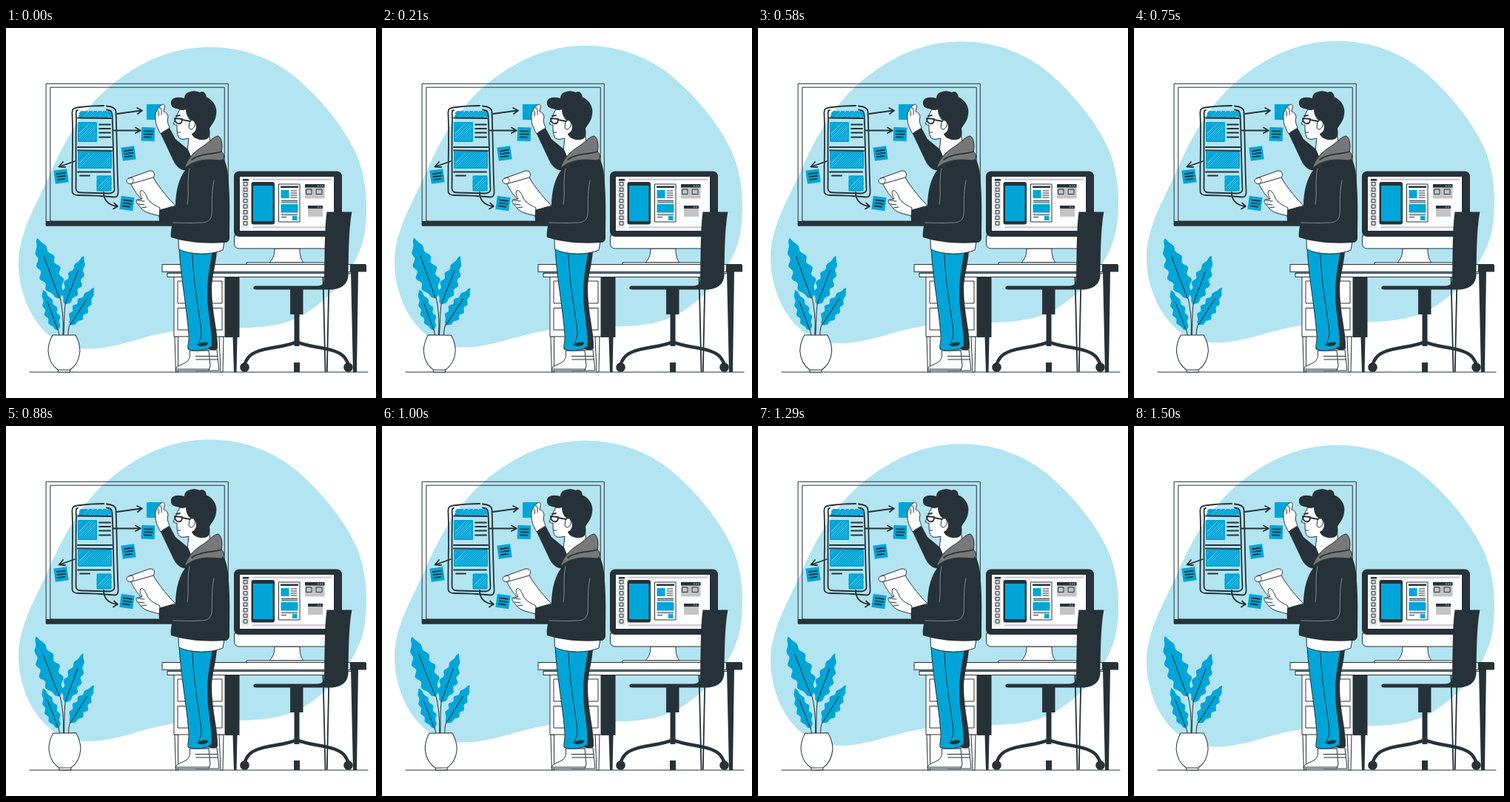
Write an HTML page that moves like this. It is 500 px wide and 500 px high and loops after 1.54 s.

```html
<!DOCTYPE html>
<html lang="en">
<head>
<meta charset="utf-8">
<title>Designer at the whiteboard</title>
<style>
  html, body { margin: 0; width: 100%; height: 100%; overflow: hidden; background: #fff; }
  svg { display: block; width: 100%; height: 100%; }
  .d { fill: #263238; }
  .b { fill: #00a5d7; }
  .w { fill: #fff; stroke: #263238; stroke-width: 1; stroke-linejoin: round; }
  .bo { fill: #00a5d7; stroke: #263238; stroke-width: 1; stroke-linejoin: round; }
  .l { fill: none; stroke: #263238; stroke-width: 1; stroke-linecap: round; stroke-linejoin: round; }
  .k { fill: none; stroke: #263238; stroke-width: 1.8; stroke-linecap: round; stroke-linejoin: round; }
  .h { fill: none; stroke: #00a5d7; stroke-width: 1.9; stroke-linejoin: round; }
  .g { fill: none; stroke: #858a8d; stroke-width: 1; stroke-linecap: round; }
</style>
</head>
<body>
<svg viewBox="0 0 500 500">
  <path id="blob" fill="#b2e4f2" d="M275 25.5C321 25.5 362 42 392 67C427 97 459 136 475 174C487 205 490 243 484 280C476 320 447 357 410 382C382 402 345 406 300 405C250 404 217 410 180 420C142 431 112 439 80 428C42 414 17 365 17 318C17 275 43 235 60 196C80 150 106 107 140 79C181 45 225 25.5 275 25.5Z"/>
  <path class="l" d="M32 465H489"/>

  <g id="board">
    <path class="l" d="M54.5 75.3H300.3V267H54.5ZM60.2 80.2H295.2V261H60.2Z"/>
    <path class="d" d="M54 261H300.5V267.5H54Z"/>
    <g id="hatch"></g>
    <path class="k" d="M132 105C118 105 106 106 96 107.5C91 108 89 110 89.5 117C91 150 89 185 89.5 221C90 225 93 226 98 226C114 226 131 227 147 228.5C151 228.5 152 225 151.5 219C150 185 150 150 148.5 113C148 108 143 106 136 105.5"/>
    <path class="k" d="M97 111C94 111 94.5 115 95 122C94 155 95 190 94.5 217C95 222 98 222.500 103 222.500L140 223.500C145 223 147 221 146.500 216C145 184 145 150 143.500 117C143 112 141 111 136 110.500"/>
    <path class="k" d="M97 121.500L142 122M126 130.500H141M126 136H141M126 141.500H141M126 147.500H141M97 161H143M97 165.500L143 166M97 194.500H141M100 199.500H113"/>
    <path class="k" d="M150 116L183 111.500M177 108L184 111.500L178 116M145 138.500H181M175 134.500L182 138.500L175 142M93 180L72 187.500M77 181L71.500 187.500L80 188M132 222C132 232 137 239 150 241M146 236.500L151 241L145 244.500"/>
    <g id="notes"></g>
  </g>

  <g id="desk">
    <path class="w" d="M228 417H232.500V465H229.500ZM288 417H294L293 465H290Z"/>
    <path class="d" d="M296 336H315.500V418H312.500L311.500 465H308L306.500 418H296ZM466 329H476L474 465H469Z"/>
    <path class="w" d="M227 336.500H296V417H227ZM232 342H292V372H232ZM232 378.500H292V408H232ZM218 331H445V336.500H218Z"/>
    <path class="w" d="M211 319.500H466V329.500H211Z"/>
    <path class="d" d="M465 319H485Q487 319 487 321V329.500H465Z"/>
    <path class="l" d="M218 331.500H470"/>
    <path class="k" d="M428.500 337L431.500 464M436.500 337L433.800 464"/>
  </g>

  <g id="screen">
    <path class="w" d="M363 298C363 308 360 313 356 317H402C398 312 397 306 397 298Z"/>
    <path class="w" d="M325 317H431V319.500H325Z"/>
    <path class="w" d="M308.500 280H453.500V291Q453.500 298 447 298H315Q308.500 298 308.500 291Z"/>
    <rect class="d" x="308" y="193.500" width="146" height="88.500" rx="7"/>
    <path fill="#fff" d="M316 201H443V274H316Z"/>
    <path fill="#d3cfd6" d="M333 203.500H440V206H333ZM333 268H440V270.500H333Z"/>
    <path fill="#e6e5e7" d="M319 203.500H328.500V270H319Z"/>
    <g id="tools"></g>
    <rect class="d" x="331.500" y="208" width="31.500" height="57.500" rx="3"/>
    <path class="b" d="M334 213H360.500V261H334Z"/>
    <path class="w" d="M368.500 211H397V262H368.500Z"/>
    <path class="d" d="M371 213.500H395V216H371ZM372 233H394V234.200H372ZM372 235.500H394V236.500H372ZM372 252H394V253H372ZM372 255H379V256H372Z"/>
    <path class="b" d="M371.500 219H382.500V230H371.500ZM371.500 238H394.500V249.500H371.500ZM387 254H393.500V260H387Z"/>
    <path class="l" d="M385 220H393M385 223H393M385 226H393M385 229H393"/>
    <path fill="#c4c4c4" d="M404 211H430.500V230.500H404ZM408 240H428V255H408Z"/>
    <path class="d" d="M404 211H430.500V215.500H404ZM408 240H428V244H408Z"/>
    <path class="l" d="M406 218H413V224.500H406ZM419.500 218H427V224.500H419.500Z"/>
    <path stroke="#fff" stroke-dasharray="1.500 1.500" d="M421 213.300H429M421 242H427"/>
  </g>

  <g id="chair">
    <path class="d" d="M433.500 248.500H467.500C463 270 463 310 462.500 334C462 347 452 353.500 438 353.500H338C333 353.500 333 348.500 338 348.500H420C428 348.500 430 345 430 337C431 305 430 275 433.500 248.500ZM384 353H401.500V387H384ZM389.500 386H396.500V430H389.500ZM389 452H397V465H389Z"/>
    <path fill="none" stroke="#263238" stroke-width="4.500" d="M393 424C380 431 355 431 340 437C329 441 325 447 322 456M393 424C406 431 430 431 445 437C456 441 460 447 463 456"/>
    <circle class="d" cx="322.500" cy="458.500" r="6.300"/>
    <circle class="d" cx="462.500" cy="458.500" r="6.300"/>
  </g>

  <g id="person">
    <path class="w" d="M256 435H285L288 463H256Z"/>
    <path class="w" d="M248 436H274L276 457L274 463H229C229 457 235 456 241 453C247 450 250 445 248 436Z"/>
    <path class="l" d="M229 461H275M256 443.500H286M257 448H286"/>
    <path class="d" d="M268 300L285 301C284 318 279 332 278 350C278 385 287 412 286 433C284 436 278 436 272 433Z"/>
    <path class="bo" d="M234 298C248 306 268 307 279 303C276 322 271 342 273 372C275 396 279 412 278 430C271 436 256 438 246 434C245 428 248 422 247 414C244 376 236 336 234 298Z"/>
    <path class="d" d="M258 428C264 424 270 424 273 425C274 428 270 430 262 430Z"/>
    <path class="l" d="M252 306C253 345 262 390 264 411C264 419 261 424 260 427"/>
    <path class="w" d="M233 284L295 288L293 300C278 307 249 307 233.500 299Z"/>
    <path class="w" d="M235 110C232 115 230 120 229.500 123L226 129C227 131 229 131 231 131C231 138 231 146 235 149.500C239 151 243 150 247 149L243 183L276 155L272 125L256 106Z"/>
    <path class="d" d="M209 143C213 139 217 136 221 135L229 150L246 164L254 183C247 190 243 193 239 192C233 190 229 185 226 179Z"/>
    <path class="d" d="M246 187C256 177 275 179 292 173C299 184 300 195 301 210C303 235 302 262 302 285C301 288 299 290 296 290C271 292 245 290 223 283C222 276 224 269 225 263L208 265C206 257 206 249 208 243L229 241C229 220 234 200 246 187Z"/>
    <path fill="#787878" stroke="#263238" d="M241 190C245 177 254 167 266 160C275 154 281 146 287 146C292 149 293 160 291 167C297 172 295 179 289 179C272 177 255 177 241 190Z"/>
    <path class="k" d="M291 167C281 171 262 169 251 178"/>
    <path class="g" d="M281 206C277 225 279 240 278 252C277 260 272 263 263 263C250 264 239 263 226 263M248 190C244 206 248 222 245 238"/>
    <path class="d" d="M223 102C222 95 230 92 241 95C241 86 253 83 262 87C268 83 273 94 270 93C281 97 286 108 284 117C283 126 278 130 275 136C277 145 274 151 267 151C258 152 252 147 251 143C257 140 258 135 256 129C249 126 243 120 243 110C238 113 233 109 230 109C226 108 223 106 223 102Z"/>
    <path class="w" d="M248 127C251 122 257 126 255 132C253 138 249 138 247 135Z"/>
    <path class="k" d="M228 122L238 123C238 128 236 130 232 129C229 128 228 126 228 122ZM238 124L249 126M230 119L235 118"/>
    <path class="l" d="M232 141H236"/>
    <path class="b" d="M190 103H213V124H190Z"/>
    <path class="w" d="M209 143C205 136 202 130 202 122C201 115 204 110 209 105C212 101 216 104 214 108L213 113C217 114 219 117 219 121C217 127 220 131 221 135C217 138 213 139 209 143Z"/>
    <path class="l" d="M208 107C210 109 211 112 210 117M205 112C207 113 207 116 206 119"/>
    <path class="w" d="M167 207L196 196C202 209 215 226 229 240L208 246C190 243 175 225 167 207Z"/>
    <path class="w" d="M166 203L194 193C201 192 202 199 199 202L171 210C163 212 160 205 166 203Z"/>
    <path class="l" d="M166 203C171 200 175 206 170 210"/>
    <path class="w" d="M208 243C202 240 194 236 191 230C189 224 185 218 182 220C180 223 182 227 184 231L177 232C174 235 179 239 182 243C187 250 198 251 207 254Z"/>
    <path class="l" d="M178 233L187 234M179 238L187 239M183 243L190 242"/>
  </g>

  <g id="plant">
    <path class="l" d="M77 415C78 392 76 375 72 360M78 415C79 396 78 382 81 368M70 405L72 415M84 415C84 407 85 402 88 397"/>
    <g id="leaves"></g>
    <path class="w" d="M70.500 460H86.500V465H70.500Z"/>
    <path class="w" d="M63 415H94C98 422 100 430 100 437C99 448 94 457 86.500 462H70.500C63 457 58 448 57 437C57 430 59 422 63 415Z"/>
  </g>
</svg>
<script>
  const $ = id => document.getElementById(id);
  const add = (id, cls, d, turn) => {
    const p = document.createElementNS('http://www.w3.org/2000/svg', 'path');
    p.setAttribute('class', cls);
    p.setAttribute('d', d);
    if (turn) p.setAttribute('transform', turn);
    $(id).append(p);
  };

  // Slanted, slightly uneven scribble filling a box
  function hatch(x, y, w, h, step) {
    const pts = [];
    for (let s = step, up = 0; s < w + h; s += step * (1 + 0.25 * Math.sin(s * 2)), up ^= 1) {
      const low = [x + Math.max(0, s - h), y + Math.min(s, h)];
      const high = [x + Math.min(s, w), y + Math.max(0, s - w)];
      pts.push(...(up ? [high, low] : [low, high]));
    }
    add('hatch', 'h', 'M' + pts.join('L'));
  }
  const box = (x, y, w, h) => add('hatch', 'h', `M${x} ${y}h${w}v${h}h${-w}z`);

  hatch(99, 113, 43, 7.5, 3);
  for (const [x, y, w, h] of [[98, 128, 24, 25], [98, 168, 44, 21], [123.5, 200.5, 18, 19]]) {
    hatch(x, y, w, h, 3.1);
    box(x, y, w, h);
  }

  // Sticky notes: centre and tilt
  [[192, 143.5, 2], [165.5, 169.5, -8], [74.5, 200.5, -8], [163.5, 237, 8]].forEach(([x, y, a]) => {
    const turn = `translate(${x} ${y}) rotate(${a})`;
    add('notes', 'b', 'M-9 -9.2H9V9.2H-9Z', turn);
    add('notes', 'k', 'M-5 -4H6M-5 0H6M-5 4H4', turn);
  });

  for (let i = 0; i < 8; i++) add('tools', 'l', `M321.5 ${208.5 + i * 7.6}h4.5v4.5h-4.5z`);
  add('tools', 'd', 'M320 204H328V206.5H320Z');

  // Wavy leaf along a straight rib
  function leaf(x0, y0, x1, y1, width, waves) {
    const dx = x1 - x0, dy = y1 - y0, len = Math.hypot(dx, dy), n = 50;
    const edge = side => Array.from({ length: n + 1 }, (_, i) => {
      const u = i / n;
      const ripple = 1 + 0.18 * Math.sin(2 * Math.PI * (waves * u + (side > 0 ? 0 : 0.3)));
      const r = side * width * Math.sin(Math.PI * u ** 0.76) ** 0.75 * ripple;
      return [(x0 + dx * u - dy / len * r).toFixed(1), (y0 + dy * u + dx / len * r).toFixed(1)];
    });
    add('leaves', 'b', 'M' + [...edge(1), ...edge(-1).reverse()].join('L') + 'Z');
    add('leaves', 'l', `M${x0} ${y0}L${x0 + dx * 0.7} ${y0 + dy * 0.7}`);
  }
  leaf(72, 365, 42, 284, 13.5, 5);
  leaf(80, 373, 105, 308, 10.5, 5);
  leaf(70, 408, 50, 354, 8.5, 4.5);
  leaf(87, 401, 119, 351, 9.5, 5);

  const LOOP = 1540, TICK = 125 / 3;
  const wave = (t, peak) => Math.cos(2 * Math.PI * (t - peak) / LOOP);

  function draw(now) {
    const ms = Math.floor(now % LOOP / 10) * 10;
    const t = Math.floor((ms + 4.9) / TICK) * TICK;
    const rise = 4.1 * (1 - wave(t, -40));
    $('blob').setAttribute('transform', `translate(0 ${(0.2 - rise).toFixed(2)})`);
    $('plant').setAttribute('transform', `rotate(${(wave(t, 320) - 0.2).toFixed(3)} 78 375)`);
  }

  const start = performance.now();
  function tick(now) {
    draw(Math.max(0, now - start));
    requestAnimationFrame(tick);
  }
  requestAnimationFrame(tick);
</script>
</body>
</html>
```
